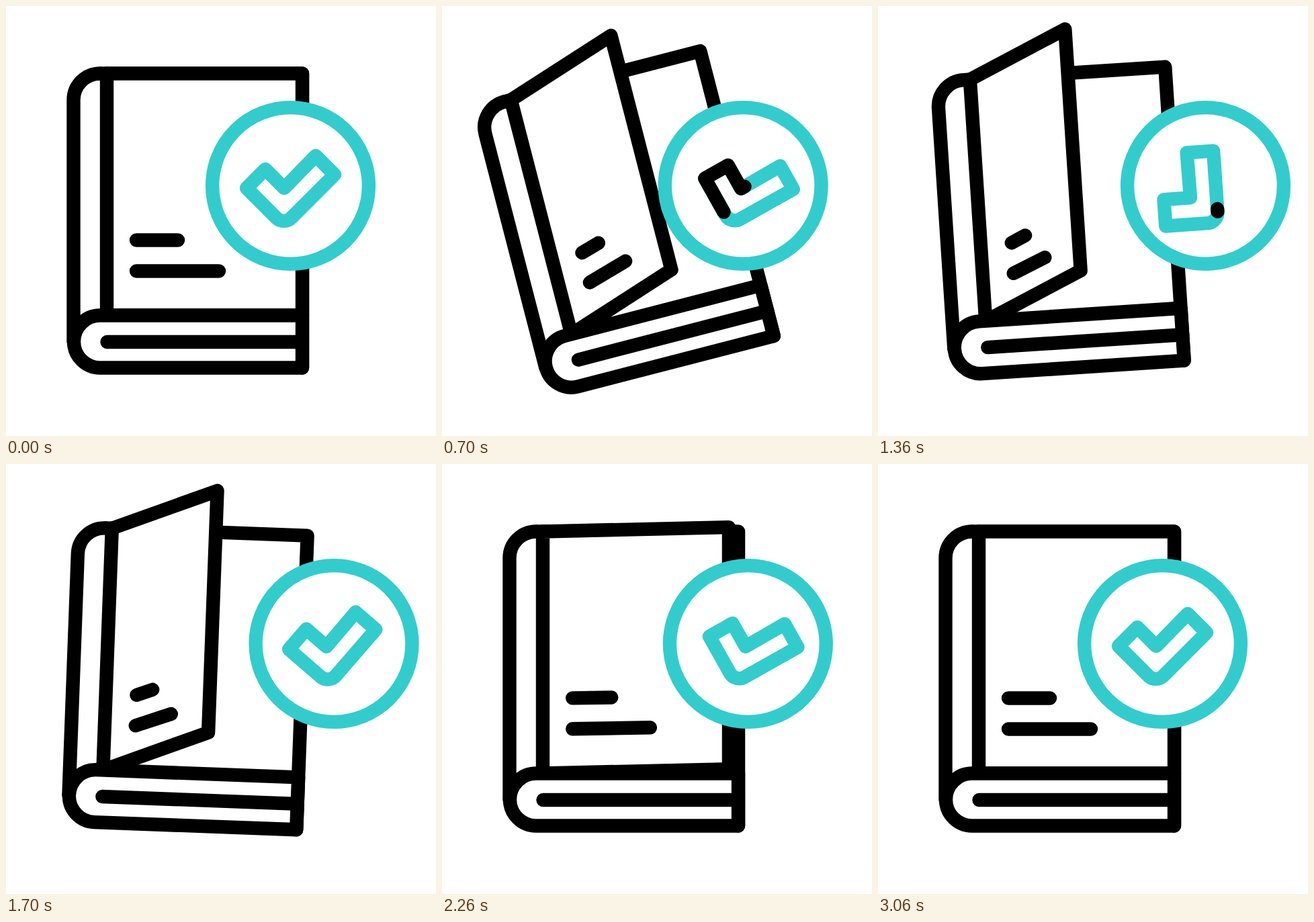
An HTML page that plays this animation: 640 by 640 pixels, repeating every 3600 ms.

```html
<!DOCTYPE html>
<html lang="en">
<head>
<meta charset="utf-8">
<title>Book approved</title>
<style>
  html, body { margin: 0; height: 100%; overflow: hidden; background: #fff; }
  svg { display: block; width: 100vw; height: 100vh; }
  path, circle { fill: none; stroke: #000; stroke-width: 20.4; stroke-linecap: round; stroke-linejoin: round; }
  .white { fill: #fff; }
  .teal { stroke: #33cccc; }
</style>
</head>
<body>
<svg viewBox="0 0 640 640">
  <g id="book">
    <path d="M150 100.5H441V538.5"/>
    <path d="M140 100.5A39.5 39.5 0 0 0 100.5 140V499.5"/>
    <path d="M140 100.5H150"/>
    <path id="cover" class="white"/>
    <path id="lines"/>
    <path class="white" d="M441 460.5H140A39 39 0 0 0 140 538.5H441Z"/>
    <path d="M150.5 500H441"/>
  </g>
  <circle id="ring" class="white teal" cx="423.5" cy="267.5" r="116.4"/>
  <g id="check">
    <path class="teal" d="M403 316L358 271L386 243L414 271L461 223L489 251L425 315A16 16 0 0 1 403 316Z"/>
    <path id="trace" pathLength="1" d="M403 316L358 271L386 243L414 271L461 223L489 251L425 315"/>
  </g>
</svg>
<script>
const LOOP = 3600, TRAVEL = 64.5;
const $ = id => document.getElementById(id);
const [book, cover, lines, ring, check, trace] =
  ['book', 'cover', 'lines', 'ring', 'check', 'trace'].map($);

const ramp = (t, a, b) => Math.min(1, Math.max(0, (t - a) / (b - a)));
const smooth = s => s * s * (3 - 2 * s);
const sine = s => (1 - Math.cos(Math.PI * s)) / 2;
const mix = (a, b, k) => a + (b - a) * k;

// Eased value between [time, value] keys
function track(t, keys) {
  let value = keys[0][1];
  for (let i = 1; i < keys.length; i++)
    value = mix(value, keys[i][1], smooth(ramp(t, keys[i - 1][0], keys[i][0])));
  return value;
}

const swing = [[390, 0], [740, -15], [1080, 7.4], [1390, -4], [1720, 2.2], [2030, 0]];
const tilt = [[0, 0], [470, 27], [1425, -50], [1900, 24], [2810, 0]];

function draw(t) {
  // Book sways while its cover opens and shuts
  book.setAttribute('transform', `rotate(${track(t, swing)} 281 307)`);
  const open = smooth(ramp(t, 411, 796)) - smooth(ramp(t, 1450, 2390) ** 1.45);
  const edge = 441 - 145 * open, lift = 65.6 * open;
  cover.setAttribute('d', `M150 100.5L${edge} ${100.5 - lift}V${460.5 - lift}L150 460.5Z`);
  const left = 194 + 2 * open;
  lines.setAttribute('d',
    `M${left} ${348.5 - 1.5 * open}L${256 - 39 * open} ${348.5 - 11 * open}` +
    `M${left} ${394.5 - 2 * open}L${317 - 73 * open} ${394.5 - 22.5 * open}`);

  // Badge slides out and back; the check mark tilts inside it
  const back = sine(ramp(t, 1785, 2729));
  const ringX = TRAVEL * (sine(ramp(t, 162, 1434)) - back);
  const checkX = TRAVEL * (sine(ramp(t, 250, 1300)) - back);
  const angle = track(t, tilt);
  ring.setAttribute('transform', `translate(${ringX})`);
  check.setAttribute('transform',
    `translate(${checkX}) rotate(${angle} ${angle > 0 ? 414.5 : 423} 293)`);

  // Black stroke runs once along the check mark
  const head = smooth(ramp(t, 380, 1080)), tail = smooth(ramp(t, 640, 1410));
  trace.style.display = head - tail > 0.001 ? '' : 'none';
  trace.setAttribute('stroke-dasharray', `${head - tail} 2`);
  trace.setAttribute('stroke-dashoffset', -tail);
}

const start = performance.now();
function frame() {
  draw((performance.now() - start) % LOOP);
  requestAnimationFrame(frame);
}
frame();
</script>
</body>
</html>
```
